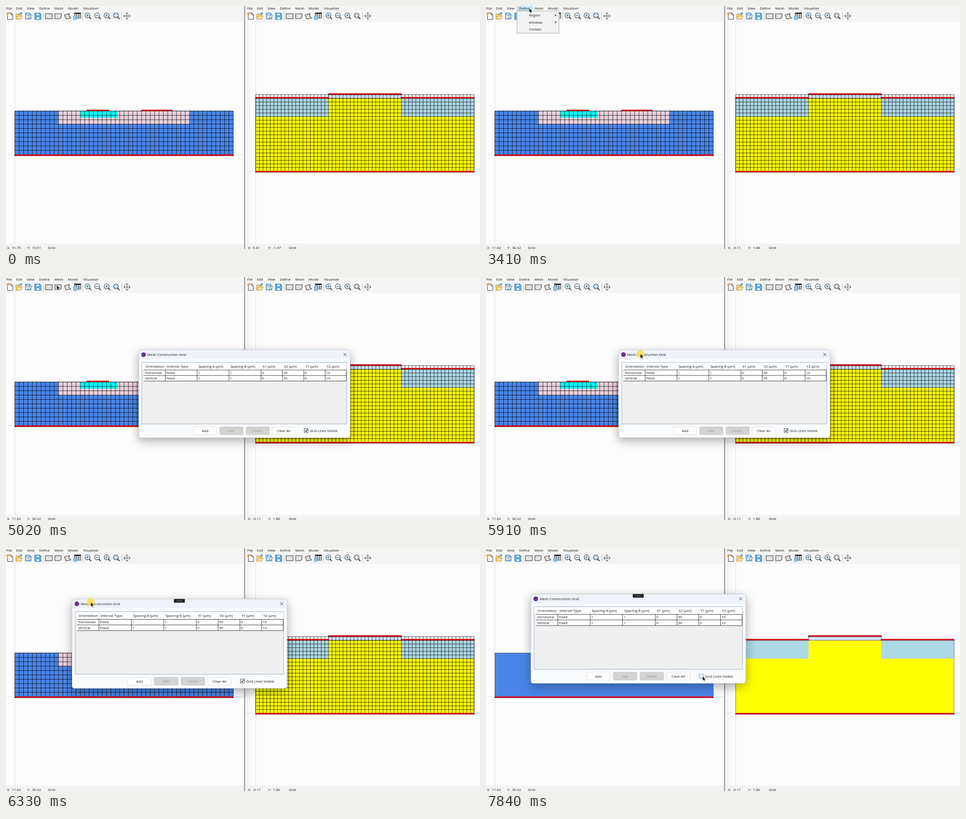
Write an HTML page that moves like this. It is 1046 px wide and 536 px high and loops after 8 s.

```html
<!DOCTYPE html>
<html lang="en">
<head>
<meta charset="utf-8">
<title>Mesh construction grid</title>
<style>
html, body { margin: 0; width: 100%; height: 100%; overflow: hidden; background: #fdfdfd; }
svg { display: block; }
text { font-family: "Open Sans", "Noto Sans", sans-serif; font-size: 7.75px; fill: #1a1a1a; white-space: pre; }
#dialog text { font-size: 7.85px; }
#shade { filter: drop-shadow(0 7px 11px rgba(0, 0, 0, .32)); }
</style>
</head>
<body>
<svg id="stage" width="1046" height="536" viewBox="0 0 1046 536"></svg>
<script>
const LOOP = 8000;
const RED = '#d9101a', INK = '#333', BLUE = '#1473b8';

const rect = (x, y, w, h, fill, more = '') =>
  `<rect x="${x}" y="${y}" width="${w}" height="${h}" fill="${fill}" ${more}/>`;
const text = (x, y, s, more = '') => `<text x="${x}" y="${y}" ${more}>${s}</text>`;
const path = (d, stroke, width = 1, fill = 'none', more = '') =>
  `<path d="${d}" stroke="${stroke}" stroke-width="${width}" fill="${fill}" ${more}/>`;
const group = (id, body, more = '') => `<g id="${id}" ${more}>${body}</g>`;

// ---- window chrome ----
const MENUS = [['File', 1], ['Edit', 22.5], ['View', 46], ['Define', 73], ['Mesh', 107], ['Model', 136.5], ['Visualiser', 170]];

function zoomIcon(x, glyph) {
  return path(`M${x + 3} 24.5L${x + 7} 28.8`, INK, 1.9) +
    `<circle cx="${x - 1}" cy="20.7" r="5.4" fill="#f4f8fb" stroke="${INK}" stroke-width="1.1"/>` +
    path(glyph, BLUE, 1.3, 'none', `transform="translate(${x - 1} 20.7)"`);
}

function toolbar() {
  const frame = 'M-2.4 -1V-2.4H-1M1 -2.4H2.4V-1M2.4 1V2.4H1M-1 2.4H-2.4V1';
  return MENUS.map(([s, x]) => text(x, 7.7, s)).join('') +
    // new
    path('M3.5 15.5H11L15 19.5V29.5H3.5Z', INK, 1, '#fff') + path('M11 15.5V19.5H15', INK) +
    path('M3.5 13.5V20.5M0 17H7M1.2 14.6L5.8 19.4M5.8 14.6L1.2 19.4', '#e39b1f', 1) +
    // open
    path('M22 29V17.5H26.5L28 19H33V22', '#c98a1b', 1, '#f8d98a') +
    path('M22 29L25 22H36L33 29Z', '#c98a1b', 1, '#fbe3a3') +
    path('M28 19.5C28.5 16.5 31 16 34.5 16M32.5 13.8L35 16L32.5 18.2', BLUE, 1.2) +
    // save as
    path('M43 16H52L55 19V28.5H43Z', BLUE, 1.2, '#cfe6f7') + rect(46, 16, 6, 4, '#fff', `stroke="${BLUE}"`) +
    path('M48.5 29L49.5 25.8L55.5 19.8L57.5 21.8L51.5 27.8Z', INK, .8, '#fff') +
    // save
    path('M63.5 15.5H74.5L77 18V29.5H63.5Z', BLUE, 1.2, '#7fc0ec') + rect(66, 16, 8, 5, '#fff', `stroke="${BLUE}"`) +
    rect(66.5, 24, 7.5, 5.5, '#fff', `stroke="${BLUE}"`) +
    // shapes
    rect(87, 17, 15, 11, '#e2e2e2', `stroke="${INK}" stroke-width="1.1"`) +
    path('M108 17H122V22Q122 28 116 28H108Z', INK, 1.1, '#e2e2e2') +
    path('M129 19.5L140 16.5L138.5 21.5L143 26.5L132.5 28.5Z', INK, 1.1, '#e2e2e2') +
    // table
    rect(151, 15, 14, 12, '#fff', `stroke="${INK}"`) + rect(151, 15, 14, 3, INK) +
    path('M151 21H165M151 24H165M155.5 15V27M160.5 15V27', INK, .9) +
    path('M149 22.5V29Q152.5 31.5 156 29V22.5Z', BLUE, .8, '#9fd0ef') +
    `<ellipse cx="152.5" cy="22.5" rx="3.5" ry="1.5" fill="#d9edf9" stroke="${BLUE}" stroke-width=".8"/>` +
    // view
    zoomIcon(181, 'M-3 0H3M0 -3V3') + zoomIcon(202, 'M-3 0H3') +
    zoomIcon(223, 'M-2 -2L2 2M2 -2L-2 2') + zoomIcon(243.5, frame) +
    path('M264.5 18L267 15.2L269.5 18M264.5 26L267 28.8L269.5 26M263 19.5L260.2 22L263 24.5M271 19.5L273.8 22L271 24.5', INK, 1.1) +
    `<circle cx="267" cy="22" r="1.8" fill="none" stroke="${INK}"/>` +
    path('M82.5 14V31M169.5 14V31M255.5 14V31', '#c4c4c4');
}

function status(id, x) {
  return text(x, 536, '', `id="${id}X"`) + text(x + 44.5, 536, '', `id="${id}Y"`) + text(x + 90, 536, 'Grid:');
}

// ---- device models ----
function gridLines(x, y, cols, rows, cell) {
  let d = '';
  for (let i = 0; i <= cols; i++) d += `M${x + i * cell} ${y}v${rows * cell}`;
  for (let j = 0; j <= rows; j++) d += `M${x} ${y + j * cell}h${cols * cell}`;
  return d;
}

function contact(x1, x2, y) {
  return rect(x1, y - 1.6, x2 - x1, 3.2, RED) + path(`M${x1} ${y + 1.4}H${x2}`, '#5e0508', .6) +
    rect(x1 - .8, y, 1.8, 1.8, '#000') + rect(x2 - 1, y, 1.8, 1.8, '#000');
}

const L = { x: 19.5, base: 328, cell: 9.64 };
const R = { x: 551, base: 364.4, cell: 8.033 };

function models() {
  const lx = n => L.x + n * L.cell, ly = n => L.base - n * L.cell;
  const rx = n => R.x + n * R.cell, ry = n => R.base - n * R.cell;
  const box = (fx, fy, a, b, c, d, fill) => rect(fx(a), fy(d), fx(b) - fx(a), fy(c) - fy(d), fill);
  return path(`M${L.x} 36V524M0 ${L.base}H526M${R.x} 36V524M527 ${R.base - .4}H1046`, '#dadada', 1) +
    box(lx, ly, 0, 50, 0, 10, '#4a86e8') +
    box(lx, ly, 10, 40, 7, 10, '#ead1dc') +
    box(lx, ly, 15, 23.5, 8.5, 10, '#00ffff') +
    box(rx, ry, 0, 60, 0, 15, '#ffff00') +
    box(rx, ry, 20, 40, 15, 20, '#ffff00') +
    box(rx, ry, 0, 20, 15, 20, '#add8e6') +
    box(rx, ry, 40, 60, 15, 20, '#add8e6') +
    box(rx, ry, 20, 40, 20, 21, '#d0dff2') +
    path(`M${lx(0)} ${ly(0)}V${ly(10)}H${lx(50)}V${ly(0)}M${rx(0)} ${ry(0)}V${ry(20)}H${rx(60)}V${ry(0)}M${rx(20)} ${ry(20)}V${ry(21)}H${rx(40)}V${ry(20)}`, '#222', .6) +
    group('grid',
      path(gridLines(L.x, ly(10), 50, 10, L.cell), '#000', .8) +
      path(gridLines(R.x, ry(21), 60, 21, R.cell), '#000', .75)) +
    contact(lx(16.5), lx(21.5), 230.2) + contact(lx(29), lx(36), 230.2) + contact(lx(0), lx(50), 329) +
    contact(rx(20), rx(40), 194) + contact(rx(0), rx(20), 202.1) + contact(rx(40), rx(60), 202.1) +
    contact(rx(0), rx(60), 365.4);
}

// ---- menus ----
function dropDown(x, w, h, items, arrows) {
  return rect(x, 11, w, h, '#f2f2f2', 'stroke="#a3a3a3" stroke-width=".9"') +
    items.map((s, i) => text(x + 26.5, 23.4 + i * 15.3, s) +
      (i < arrows ? path(`M${x + 84} ${18.2 + i * 15.3}l3 2.4l-3 2.4z`, 'none', 0, '#222') : '')).join('');
}
const hotMenu = (id, x, w) => group(id, rect(x, -1, w, 11.5, '#cbe6f5', 'stroke="#84b9d8" stroke-width=".8"'));

// ---- dialog, drawn from its own top left corner ----
function dialog() {
  const cols = [11.5, 59.5, 131, 202.5, 274.5, 322.5, 370.5, 418.5, 466];
  const heads = ['Orientation', 'Interval Type', 'Spacing A (µm)', 'Spacing B (µm)', 'X1 (µm)', 'X2 (µm)', 'Y1 (µm)', 'Y2 (µm)'];
  const values = ['Fixed', 1, 1, 0, 50, 0, 10];
  const row = (name, y) => [name, ...values].map((s, i) => text(cols[i] + 2.2, y, s)).join('');
  const button = (x, s, off) =>
    rect(x, 172.5, 52, 17.5, off ? '#d3d3d3' : '#fefefe', `rx="2.5" stroke="${off ? '#c2c2c2' : '#dcdcdc'}" stroke-width=".9"`) +
    text(x + 26, 184, s, `text-anchor="middle" ${off ? 'style="fill:#9b9b9b"' : ''}`);
  return rect(0, 0, 474.5, 197, '#fafbfc', 'id="shade" rx="5" stroke="#b9bcc4" stroke-width=".8"') +
    path('M.4 20.5V5Q.4 .4 5 .4H469.5Q474.1 .4 474.1 5V20.5Z', 'none', 0, '#eef2f9') +
    '<circle cx="10.8" cy="10.5" r="5.2" fill="#6b3590"/>' +
    text(19.2, 13.4, 'Mesh Construction Grid') +
    path('M459.6 7.2l6.6 6.6m0 -6.6l-6.6 6.6', '#222', .9) +
    rect(7, 28, 460, 138, '#efefef', 'stroke="#8aa9cc" stroke-width=".9"') +
    rect(7.5, 28.5, 459, 16.3, '#fefefe') + rect(11, 44.8, 455, 25, '#fff') +
    heads.map((s, i) => text(cols[i] + (i ? 3.5 : 3.2), 39.9, s, 'style="font-size:8px"')).join('') +
    path('M' + cols.slice(1, 8).map(x => x + ' 30V44').join('M'), '#e6e6e6', .7) +
    path('M11 44.9H466M11 57.2H466M11 69.7H466M' + cols.slice(1).map(x => x + ' 44.9V69.7').join('M'), '#222', .9) +
    row('Horizontal', 53.9) + row('Vertical', 66.5) +
    button(123, 'Add') + button(182, 'Edit', true) + button(241, 'Delete', true) + button(299.3, 'Clear All') +
    rect(371.6, 176.6, 8.6, 8.6, '#fff', 'id="check" stroke-width=".9"') +
    path('M373.4 180.8l2 2.2l3.6 -4.6', '#111', 1.3, 'none', 'id="tick"') +
    text(384, 184, 'Grid Lines Visible') +
    group('handle', rect(225, 0, 24, 8, '#1d1d1d') + rect(230, 3, 14, 2, '#5a5a5a'));
}

const stage = document.getElementById('stage');
stage.innerHTML =
  '<defs><linearGradient id="edge"><stop offset="0" stop-opacity=".05"/><stop offset="1" stop-opacity="0"/></linearGradient></defs>' +
  rect(0, 0, 1046, 536, '#fdfdfd') + rect(527, 36, 20, 488, 'url(#edge)') +
  rect(0, 0, 1046, 35.5, '#f5f5f5') + rect(0, 524, 1046, 12, '#f3f3f3') +
  models() +
  group('hotTool', rect(105, 12, 19.5, 20.5, '#d6e6f2')) +
  hotMenu('hotDefine', 69, 32.5) + hotMenu('hotMesh', 102, 29.5) +
  group('barLeft', toolbar()) + group('barRight', toolbar(), 'transform="translate(531.3 0)"') +
  status('left', 2.5) + status('right', 534) +
  rect(525.7, 0, 1.6, 536, '#777') +
  group('defineMenu', dropDown(68.5, 92.5, 49, ['Region', 'Window', 'Contact'], 2)) +
  group('meshMenu', dropDown(102, 198.5, 64.5, ['', '', '', ''], 0) +
    rect(104, 14, 195, 14, '#cbe6f5', 'id="hotItem"') +
    ['Mesh Construction Grid', 'Mesh Refinement', 'Create Mesh', 'Clear Mesh'].map((s, i) => text(128.5, 23.4 + i * 15.3, s)).join('')) +
  group('dialog', dialog()) +
  '<circle id="press" r="8.6" fill="#f7df2c" opacity=".75"/>' +
  path('M0 0V9.6L2.3 7.5L3.9 11L5.4 10.3L3.9 6.9H7Z', '#fff', .5, '#000', 'id="cursor"');

const el = {};
stage.querySelectorAll('[id]').forEach(e => el[e.id] = e);

// ---- motion: [time, values...] ----
const CURSOR = [
  [500, 984, 522], [640, 960, 505], [760, 880, 452], [880, 700, 335], [970, 460, 205],
  [1040, 235, 118], [1110, 170, 80], [1180, 150, 55], [1250, 138, 33], [1390, 124, 27],
  [1590, 123, 25], [1800, 117, 16], [1940, 115, 12], [2270, 115, 5], [2540, 115, 5],
  [2750, 103, 6], [3000, 95, 5], [3740, 96, 5], [3810, 112, 5], [4010, 112, 6],
  [4220, 112, 18], [5090, 112, 18], [5200, 165, 52], [5300, 280, 108], [5430, 337, 142],
  [5710, 341, 171], [5910, 341, 170], [5980, 325, 161], [6120, 255, 137], [6400, 165, 114],
  [6540, 148, 111], [6740, 147, 111], [6950, 225, 188], [7100, 375, 288], [7200, 445, 309],
  [7320, 472, 300], [7500, 478, 283]
];
const DIALOG = [
  [5910, 293, 161], [5980, 275, 154], [6120, 218, 132.5], [6400, 122, 106], [6540, 100, 101.8], [6610, 99, 101.5]
];

function at(track, t) {
  const i = track.findIndex(k => k[0] > t);
  if (i === 0) return track[0].slice(1);
  if (i < 0) return track[track.length - 1].slice(1);
  const a = track[i - 1], b = track[i], f = (t - a[0]) / (b[0] - a[0]);
  return [1, 2].map(n => a[n] + (b[n] - a[n]) * f);
}

const clamp = v => Math.max(0, Math.min(1, v));
const within = (t, ...spans) => spans.some(([a, b]) => t >= a && t < b);
const show = (name, on) => el[name].style.display = on ? '' : 'none';

function readout(side, x, y) {
  el[side + 'X'].textContent = 'X:  ' + x.toFixed(2);
  el[side + 'Y'].textContent = 'Y:  ' + y.toFixed(2);
}

function draw(t) {
  const [x, y] = at(CURSOR, t);
  el.cursor.setAttribute('transform', `translate(${x} ${y})`);
  el.press.setAttribute('transform', `translate(${x} ${y})`);
  show('cursor', t >= 500);
  show('press', within(t, [3130, 3270], [4600, 4740], [5710, 6680], [7570, 7770]));

  // each pane keeps the last position seen over it
  if (t < 500) readout('right', 5.31, -1.97);
  else if (x > 542) readout('right', (x - R.x) / R.cell / 10, (R.base - y) / R.cell / 10);
  else readout('right', -.11, 1.68);
  if (t < 500 || x > 526 && t < 1250) readout('left', 51.75, 10.51);
  else if (t < 1250) readout('left', (x - L.x) / L.cell, (L.base - y) / L.cell);
  else readout('left', 11.62, 30.32);

  show('hotTool', within(t, [1320, 2010]));
  show('hotMesh', within(t, [2010, 2750], [3740, 4670]));
  show('hotDefine', within(t, [2750, 3740]));
  show('defineMenu', within(t, [3200, 3740]));
  el.defineMenu.style.opacity = clamp((t - 3130) / 210);
  show('meshMenu', within(t, [3740, 4670]));
  show('hotItem', t >= 4150);

  const [dx, dy] = at(DIALOG, t);
  const open = clamp((t - 4670) / 210);
  const scale = t < 5980 ? .983 : 1, s = scale * (.93 + .07 * open);
  const ox = 237 * (scale - s), oy = 98 * (scale - s);
  el.dialog.setAttribute('transform', `translate(${dx + ox} ${dy + oy}) scale(${s})`);
  el.dialog.style.opacity = open;
  show('dialog', t >= 4670);
  show('handle', t >= 5980);

  const lines = t < 7640;
  show('grid', lines);
  show('tick', lines);
  el.check.setAttribute('stroke', lines ? '#333' : '#3f8fd0');
}

function tick() {
  draw(performance.now() % LOOP);
  requestAnimationFrame(tick);
}
tick();
</script>
</body>
</html>
```
